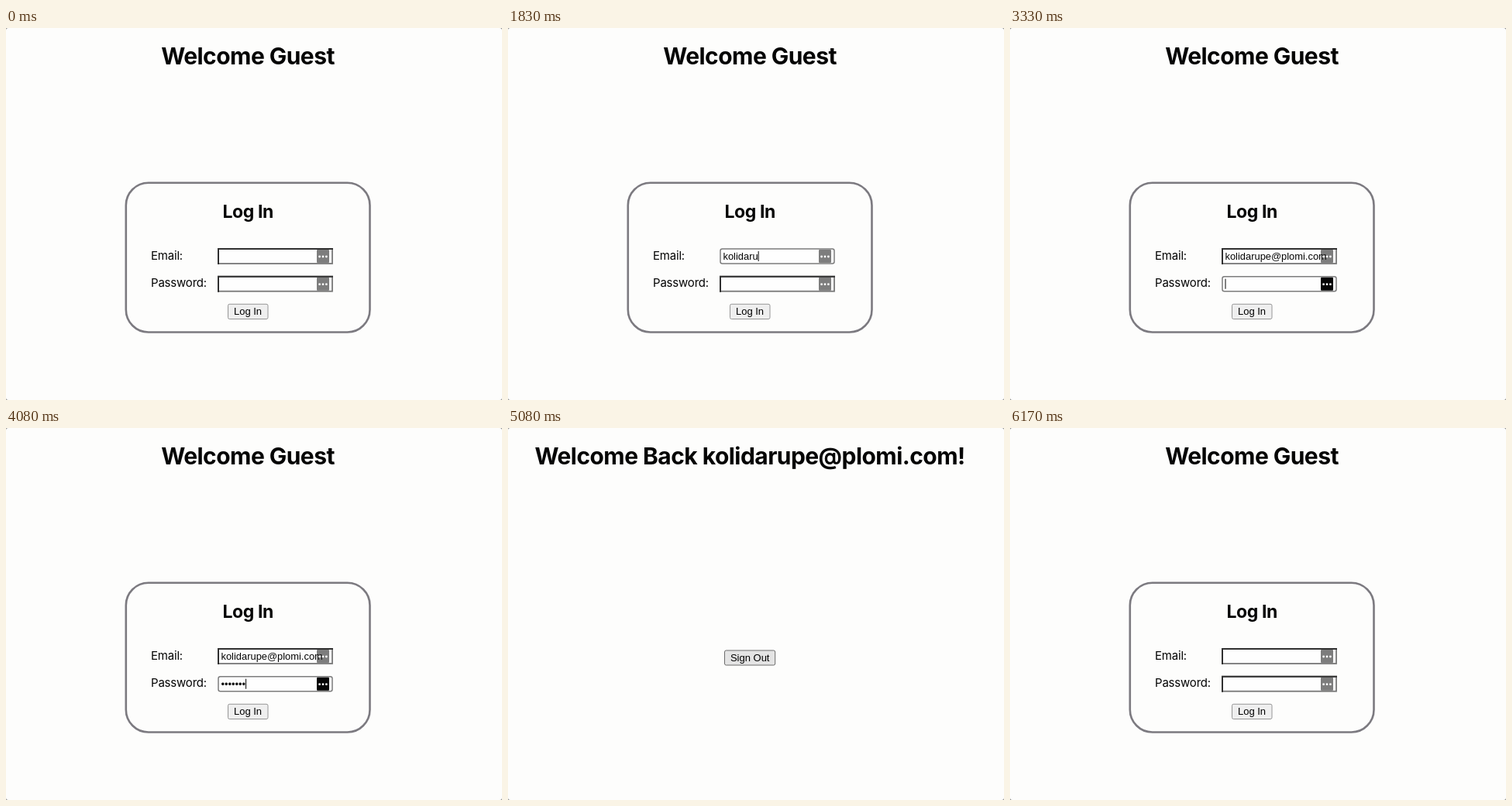
An HTML page for the animation above (6.26 s loop, 640x480 px).

```html
<!DOCTYPE html>
<html lang="en">
<head>
<meta charset="utf-8">
<title>Log in</title>
<style>
  html, body { margin: 0; width: 100%; height: 100%; overflow: hidden; background: #888; }
  svg { display: block; width: 640px; height: 480px; }
  text { white-space: pre; }
  .title, .label { font-family: Inter, Roboto, sans-serif; fill: #050505; }
  .title { font-weight: 700; text-anchor: middle; }
  #heading { font-size: 30px; letter-spacing: -.55px; }
  .sub { font-size: 23px; letter-spacing: -.4px; }
  .label { font-size: 15px; letter-spacing: -.2px; }
  .value { font: 12.9px "Liberation Sans", Arial, sans-serif; fill: #050505; }
  .button text { font: 13px "Liberation Sans", Arial, sans-serif; text-anchor: middle; }
  .button rect { fill: #efefef; stroke: #969696; }
  #signOut rect { fill: #e4e4e4; stroke: #6c6c6c; }
  .round { fill: #fefefe; stroke: #7c7c7c; stroke-width: 1.5; }
</style>
</head>
<body>
<svg viewBox="0 0 640 480">
  <rect width="640" height="480" rx="3" fill="#fdfdfc"/>
  <text id="heading" class="title" x="312" y="47"></text>
  <g id="login">
    <rect x="154.8" y="199.8" width="314.7" height="192.7" rx="29" fill="none" stroke="#7c7a80" stroke-width="2.6"/>
    <text class="title sub" x="312.2" y="245">Log In</text>
    <text class="label" x="187" y="299">Email:</text>
    <text class="label" x="187" y="334.3">Password:</text>
    <g id="email" transform="translate(273 284)"></g>
    <g id="password" transform="translate(273 319.7)"></g>
    <g class="button">
      <rect x="286.5" y="356.3" width="51.5" height="19.2" rx="2"/>
      <text x="312" y="370.2">Log In</text>
    </g>
  </g>
  <g id="signOut" class="button">
    <rect x="279.5" y="287" width="65.2" height="19" rx="2"/>
    <text x="312.2" y="301">Sign Out</text>
  </g>
  <path id="pointer" d="M46 24v10l2.5-2.3 4 .3z" fill="#000" stroke="#fdfdfc" stroke-width=".8"/>
</svg>
<script>
const LOOP = 6260;
const ADDRESS = "kolidarupe@plomi.com";
const EMAIL_FOCUS = 1000, EMAIL_START = 1215, PASSWORD_FOCUS = 3000, PASSWORD_START = 3400;
const SIGNED_IN = 4170, SIGNED_OUT = 5330, FORM_READY = 5420;

const $ = id => document.getElementById(id);
const show = (el, on) => el.setAttribute("visibility", on ? "inherit" : "hidden");
const within = (t, from, to) => t >= from && t < to;
const typed = (t, start, step, max) =>
  Math.max(0, Math.min(max, Math.floor((t - start) / step)));

function makeField(id) {
  const root = $(id);
  root.innerHTML = `
    <g class="bevel">
      <rect x="1" y="1" width="147" height="19" fill="#fefefe" stroke="#777" stroke-width="1.8"/>
      <path d="M1 21V1H149" fill="none" stroke="#303030" stroke-width="2"/>
    </g>
    <rect class="round" x="1" y="1" width="147" height="19" rx="2.5"/>
    <text class="value" x="4.5" y="15"></text>
    <path class="caret" d="M0 4V17" stroke="#050505"/>
    <g class="icon">
      <rect x="128" y="2" width="16" height="17" rx="1"/>
      <path d="M131.6 11h.01M136 11h.01M140.4 11h.01" stroke="#fcfcfc" stroke-width="2.8" stroke-linecap="round"/>
    </g>`;
  const part = name => root.querySelector("." + name);
  const [bevel, round, value, caret, icon] = ["bevel", "round", "value", "caret", "icon"].map(part);

  return ({ text, focus, plain, hover, edge }) => {
    value.textContent = text;
    show(bevel, !focus && !plain);
    show(round, focus || plain);
    round.style.stroke = plain ? edge : "";
    round.style.strokeWidth = plain ? 1.1 : "";
    show(icon, !plain);
    icon.firstElementChild.setAttribute("fill", hover ? "#050505" : "rgba(24,24,24,.56)");
    show(caret, focus);
    const width = text ? value.getComputedTextLength() : 0;
    caret.setAttribute("transform", `translate(${5 + width})`);
  };
}

const drawEmail = makeField("email");
const drawPassword = makeField("password");

function draw(now) {
  const t = now % LOOP;
  const signedIn = within(t, SIGNED_IN, SIGNED_OUT);
  const plain = within(t, SIGNED_OUT, FORM_READY);
  const filling = t < SIGNED_IN;
  const onPassword = within(t, PASSWORD_FOCUS, SIGNED_IN);

  $("heading").textContent = signedIn ? `Welcome Back ${ADDRESS}!` : "Welcome Guest";
  show($("login"), !signedIn);
  show($("signOut"), signedIn);
  show($("pointer"), within(t, 4420, 4830));

  drawEmail({
    text: filling ? ADDRESS.slice(0, typed(t, EMAIL_START, 76.4, ADDRESS.length)) : "",
    focus: within(t, EMAIL_FOCUS, PASSWORD_FOCUS),
    plain, edge: "#606060"
  });
  drawPassword({
    text: filling ? "•".repeat(typed(t, PASSWORD_START, 80, 7)) : "",
    focus: onPassword, hover: onPassword,
    plain, edge: "#9c9c9c"
  });
}

const start = performance.now();
function tick() {
  draw(performance.now() - start);
  requestAnimationFrame(tick);
}
tick();
</script>
</body>
</html>
```
